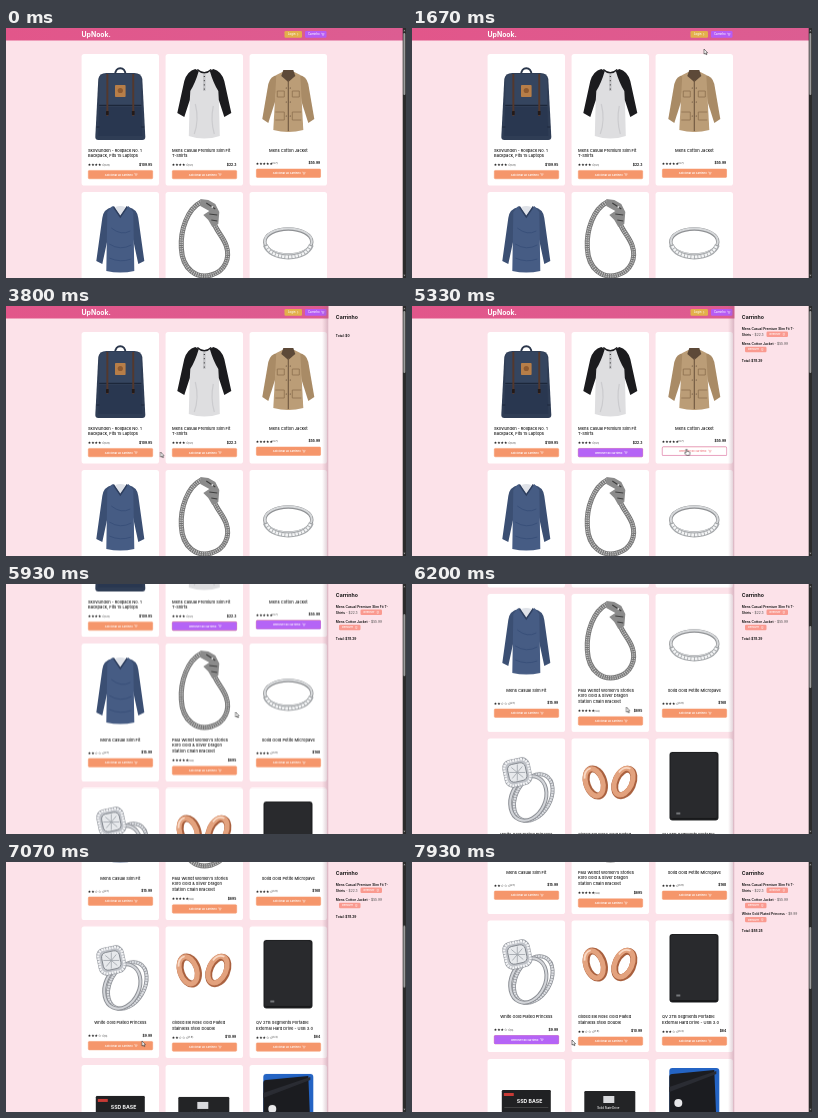
An HTML page for the animation above (8000 ms loop, 400 by 250 pixels).

```html
<!DOCTYPE html>
<html lang="pt">
<head>
<meta charset="utf-8">
<title>Loja</title>
<style>
html, body { margin: 0; width: 100%; height: 100%; overflow: hidden; background: #fce2e9; }
svg { display: block; width: 400px; height: 250px; }
text { font-family: Inter, "Open Sans", sans-serif; fill: #141414; font-weight: 500; }
.b { font-weight: 700; }
.w { fill: #fff; }
.star { font-family: "DejaVu Sans", sans-serif; }
</style>
</head>
<body>
<svg id="stage" viewBox="0 0 400 250" xmlns="http://www.w3.org/2000/svg"></svg>
<script>
const LOOP = 8000;
const css = [];

// Registers a looping keyframe track on an id; keys are [ms, declarations].
function track(id, keys, easing = 'linear') {
  const frames = keys.map(([ms, style]) => `${(ms / LOOP * 100).toFixed(3)}% { ${style} }`);
  css.push(`@keyframes ${id} { ${frames.join(' ')} }
    #${id} { animation: ${id} ${LOOP}ms ${easing} infinite; }`);
}
const at = (x, y) => `transform: translate(${x}px, ${y}px)`;

// Shows an element only inside the given [from, to] spans.
function show(id, ...spans) {
  const keys = [[0, 'opacity: 0']];
  for (const [from, to] of spans) {
    keys.push([from, 'opacity: 1']);
    if (to < LOOP) keys.push([to, 'opacity: 0']);
  }
  keys.push([LOOP, `opacity: ${spans[spans.length - 1][1] < LOOP ? 0 : 1}`]);
  track(id, keys, 'step-end');
}

const text = (x, y, size, s, cls = '', extra = '') =>
  `<text x="${x}" y="${y}" font-size="${size}" class="${cls}" ${extra}>${s}</text>`;
const rect = (x, y, w, h, r, fill, extra = '') =>
  `<rect x="${x}" y="${y}" width="${w}" height="${h}" rx="${r}" fill="${fill}" ${extra}/>`;
const path = (d, fill, extra = '') => `<path d="${d}" fill="${fill}" ${extra}/>`;
const line = (d, color, w, extra = '') =>
  `<path d="${d}" fill="none" stroke="${color}" stroke-width="${w}" ${extra}/>`;
const oval = (x, y, rx, ry, color, w, extra = '') =>
  `<ellipse cx="${x}" cy="${y}" rx="${rx}" ry="${ry}" fill="none" stroke="${color}" stroke-width="${w}" ${extra}/>`;
const dot = (x, y, r, fill) => `<circle cx="${x}" cy="${y}" r="${r}" fill="${fill}"/>`;
const group = (x, y, s, id = '') =>
  `<g ${id && `id="${id}"`} transform="translate(${x} ${y})">${s}</g>`;
const pair = s => s + `<g transform="scale(-1 1)">${s}</g>`;

// Product pictures: x from the card's centre, y from its top.
const art = {
  backpack: line('M-5 21C-6 12 6 12 5 21', '#2a364b', 1.8) +
    path('M-22 25Q-21 19 -14 19H14Q21 19 22 25L25 83Q25 86 22 86H-22Q-25 86 -25 83Z', '#2f3d55') +
    path('M-21 25Q-20 20 -14 20H14Q20 20 21 25L21 50H-21Z', '#35455f') +
    path('M-21 53H21L22 82H-22Z', '#293750') +
    line('M-21 51.5H21M-24 73H-21M21 73H24', '#1c273a', 1) +
    pair(rect(12, 20, 1.9, 42, .4, '#54382c') + rect(11.6, 57, 2.7, 4, .4, '#241a18')) +
    rect(-5.3, 31, 10.6, 12, .8, '#b77e48') + dot(0, 36.5, 2.6, '#8e5a30'),
  tshirt: path('M-9 16Q0 21 9 16L14 23L15.5 82Q0 87 -15.5 82L-14 23Z', '#dedee0') +
    line('M-9 50Q-5 66 -10 80M9 52Q6 66 10 80', '#cbcbce', 1.2) +
    pair(path('M-9 15Q-17 17 -20 27L-27 59L-20 63L-14.5 46L-14 37Q-9 29 -5.5 17Z', '#1b1b1e')) +
    line('M-7 15.5Q0 22 7 15.5', '#1b1b1e', 1.6) +
    line('M0 20V37', '#c5c5c8', 2.6) + line('M0 22V37', '#222', 1, 'stroke-dasharray="1 3.2"'),
  jacket: pair(path('M-11 21Q-18 22 -20 30L-26 65L-20 69L-13 47Z', '#a98b66')) +
    path('M-12 21L-6 18H6L12 21L15 76Q0 80 -15 76Z', '#bb9d77') +
    path('M-7 22L-5 16H5L7 22L0 28Z', '#5d4938') +
    line('M0 26V77', '#6d563f', 1.1) +
    pair(line('M-13 58H-4V66H-13M-11 37H-4V43H-11Z', '#8d7050', .8) + dot(-2, 34, .6, '#5d4938') +
      dot(-2, 48, .6, '#5d4938') + dot(-2, 62, .6, '#5d4938')),
  sweater: pair(path('M-8 15Q-17 17 -18 26L-24 69L-18 72L-12 44Z', '#3b4f73')) +
    path('M-8 14L0 24L8 14L13 20L14 79Q0 82 -14 79L-13 20Z', '#465c84') +
    path('M-5 15L0 24L5 15Q0 13 -5 15Z', '#dfe2e8') +
    line('M-7 14.5L0 25L7 14.5', '#2d3e5e', 1.5) +
    line('M-9 36Q1 44 10 39M-11 52Q0 59 11 53M-11 66Q0 71 11 67', '#39507a', 1),
  bracelet: (() => {
    const d = 'M-3 10C-17 17 -24 38 -23 56C-22 78 -7 87 7 83C21 79 26 66 22 54C19 45 13 40 10 32';
    return line(d, '#737373', 5) + line(d, '#c3c3c3', 3.4, 'stroke-dasharray="1.2 1"') +
      line(d, '#555', .6, 'stroke-dasharray="1 1.2"') +
      path('M-4 7L4 8L11 12L15 20L14 32L8 35L4 28L-1 23L5 19L-4 14Z', '#8b8b8b') +
      line('M2 11L11 17M5 22L13 23M7 28L13 29', '#3f3f3f', 1.1) + dot(8, 15, 1, '#ddd');
  })(),
  band: oval(0, 50, 23.5, 13, '#8f9194', 3.4) + oval(0, 49.4, 23.5, 13, '#d6d8da', 2) +
    line('M-23 53Q-19 64 0 65Q19 64 23 53', '#a5a8ab', 5) +
    line('M-22 54Q-18 64 0 65Q18 64 22 54', '#f3f4f5', 2.8, 'stroke-dasharray="2.5 .8"'),
  halo: oval(7, 59, 17, 25, '#8d9096', 4, 'transform="rotate(30 7 59)"') +
    oval(7, 59, 17, 25, '#dfe1e5', 2.4, 'transform="rotate(30 7 59)" stroke-dasharray="2 .6"') +
    oval(2, 60, 17, 23, '#8d9096', 4, 'transform="rotate(24 2 60)"') +
    oval(2, 60, 17, 23, '#d4d6da', 2, 'transform="rotate(24 2 60)"') +
    `<g transform="rotate(-12 -9 34)">${rect(-23, 20, 28, 28, 8, '#92969d') +
      rect(-21.3, 21.7, 24.6, 24.6, 7, '#bfc2c8', 'stroke="#f2f3f5" stroke-width="2.5" stroke-dasharray="2 .7"') +
      rect(-18, 25, 18, 18, 5, '#e7e9ec', 'stroke="#777b82" stroke-width=".8"')}</g>` +
    line('M-15 29L-3 39M-4 28L-14 40M-9 26V42M-17 34H-1', '#9ea2a9', .8),
  hoops: [-15, 14].map((x, i) => `<g transform="rotate(${i ? 24 : -18} ${x} 44)">` +
    oval(x, 44, 8.5, 14, '#a9603e', 7) + oval(x - 1, 43.5, 8.5, 14, '#e3a27e', 5) +
    line(`M${x - 9} 37Q${x - 7} 29 ${x} 29`, '#f9d9c5', 1.8) + '</g>').join(''),
  drive: rect(-24.8, 13.5, 49, 68.5, 3, '#1f2022') + rect(-23.5, 14.5, 46, 65.5, 2.5, '#292a2d') +
    line('M-22 80.5H22', '#101012', 1.2) + rect(-18, 74, 4, 2, 0, '#77797c'),
  ssd: rect(-24.5, 31, 49, 36, 1.2, '#202123') + rect(-22.5, 34, 10, 3, .5, '#c83a35') +
    text(-9.5, 43.5, 5.2, 'SSD BASE', 'b w') + rect(-22, 48, 44, .6, 0, '#555'),
  flash: rect(-26, 32, 51, 36, 1.2, '#232426') + rect(-7, 37, 11, 7, 0, '#d9dadd') +
    text(-13, 49.5, 2.8, 'Solid State Drive', 'w'),
  game: rect(-25, 9, 50, 80, 3, '#2464c4') + path('M-25 18Q-25 15 -22 15L20 11L23 86H-25Z', '#1b1c20') +
    path('M-25 28L22 12V15L-25 33Z', '#2a2c33') + dot(-16, 44, 4, '#e8e8ea')
};

// Rows of [picture, title lines, stars, rating, price, added at, hover spans].
const rows = [
  [26, 131.5, [
    ['backpack', ['Skovlunden - Rollpack No. 1', 'Backpack, Fits 15 Laptops'], 4, 3.9, '$109.95'],
    ['tshirt', ['Mens Casual Premium Slim Fit', 'T-Shirts'], 4, 4.1, '$22.3', 4270, [4050, 4560]],
    ['jacket', ['Mens Cotton Jacket'], 5, 4.7, '$55.99', 4930, [4680, 5400]]]],
  [164, 138, [
    ['sweater', ['Mens Casual Slim Fit'], 2, 2.1, '$15.99'],
    ['bracelet', ["Paul Wendt Women's Stories", 'Koro Gold &amp; Silver Dragon', 'Station Chain Bracelet'], 5, 4.6, '$695'],
    ['band', ['Solid Gold Petite Micropave'], 4, 3.9, '$168']]],
  [308.5, 131.5, [
    ['halo', ['White Gold Plated Princess'], 3, 3, '$9.99', 7730, [7130, 7860]],
    ['hoops', ['Gilded Elk Rose Gold Plated', 'Stainless Steel Double'], 2, 1.9, '$10.99'],
    ['drive', ['QV 2TB Segments Portable', 'External Hard Drive - USB 3.0'], 3, 3.3, '$64']]],
  [447, 138, [['ssd'], ['flash'], ['game']]]
];

const cartIcon = (x, y, color) =>
  line(`M${x} ${y}h.6l.5 1.5h1.5l.4-1.1h-2.1`, color, .35) +
  dot(x + 1.2, y + 2.1, .3, color) + dot(x + 2.3, y + 2.1, .3, color);

function button(y, fill, color, label, edge = fill) {
  return rect(-32, y, 64.4, 8.4, 1, fill, `stroke="${edge}" stroke-width=".5"`) +
    text(-1.5, y + 5.2, 2.7, label, '', `text-anchor="middle" style="fill:${color};font-weight:600"`) +
    cartIcon(14, y + 3, color);
}

function card([pic, title, stars, rate, price, added, hover], col, top, height) {
  let s = rect(-38.7, 0, 77.4, height, 2.6, '#fff') + art[pic];
  if (title) {
    const n = title.length;
    title.forEach((t, i) => {
      s += n > 1 ? text(-32.3, 97.5 + i * 5.9, 4.05, t)
        : text(0, 97.5, 4.05, t, '', 'text-anchor="middle"');
    });
    const y = [0, 115, 116.4, 122.8][n];
    s += text(-32.5, y - 4.4, 3.8, '★'.repeat(stars) + '☆'.repeat(5 - stars), 'star') +
      text(-16.2, y - 4.8, 2.5, `(${rate})`, '', 'style="fill:#555"') +
      text(32, y - 4.6, 3.35, price, 'b', 'text-anchor="end"') +
      button(y, '#f5966b', '#fff', 'Adicionar ao carrinho');
    if (added) {
      s += `<g id="${pic}-in">${button(y, '#b564f6', '#fff', 'Remover do carrinho')}</g>` +
        `<g id="${pic}-over">${button(y, '#fff', '#ef7f86', 'Remover do carrinho')
          .replace('stroke="#fff"', 'stroke="#ef8d90"')}</g>`;
      show(pic + '-in', [added, LOOP]);
      show(pic + '-over', hover);
    }
  }
  return group(114.3 + col * 84, top, s);
}

const header = rect(0, 0, 397, 12.5, 0, 'url(#bar)') +
  text(75.5, 8.8, 6.9, 'UpNook.', 'b w') +
  rect(278.5, 3, 17.5, 6.7, 1.2, '#e3b04b') + text(282, 7.3, 2.8, 'Login', 'w') +
  line('M291 5.2l1.2 1.1l-1.2 1.1', '#fff', .4) +
  rect(299, 3, 21.5, 6.7, 1.2, '#b65cf5') + text(302, 7.3, 2.8, 'Carrinho', 'w') +
  cartIcon(315.2, 5.2, '#fff');

const page = header + rows.map(([top, height, items]) =>
  items.map((item, col) => card(item, col, top, height)).join('')).join('');

const pill = (x, y) => rect(x, y, 21.5, 5.4, 1.2, '#fa9a90') +
  text(x + 3, y + 3.6, 2.6, 'Remover', 'w') +
  line(`M${x + 16.3} ${y + 1.8}h2m-1.7 .2l.2 1.8h1l.2-1.8`, '#fff', .35);
const entry = (id, y, name, price) => `<g id="${id}">` +
  text(329.8, y, 3.3, `${name}<tspan style="font-weight:400;fill:#555"> - ${price}</tspan>`, '', 'style="font-weight:600"') +
  pill(333, y + 2.3) + '</g>';

const totals = [[30, '$0', 0, 4270], [41.5, '$22.3', 4270, 4930],
  [55, '$78.29', 4930, 7730], [69, '$88.28', 7730, LOOP]];

const drawer = rect(316, 0, 6.5, 250, 0, 'url(#shade)') + rect(322.5, 0, 78, 250, 0, '#fce2e9') +
  text(329.8, 12.6, 5.2, 'Carrinho', 'b') +
  `<g id="item1">${text(329.8, 24.2, 3.3, 'Mens Casual Premium Slim Fit T-', '', 'style="font-weight:600"') +
    text(329.8, 29.6, 3.3, 'Shirts<tspan style="font-weight:400;fill:#555"> - $22.3</tspan>', '', 'style="font-weight:600"') +
    pill(354.5, 25.6)}</g>` +
  entry('item2', 38.5, 'Mens Cotton Jacket', '$55.99') +
  entry('item3', 52.6, 'White Gold Plated Princess', '$9.99') +
  totals.map(([y, sum], i) => `<g id="total${i}">${text(329.8, y + 1.2, 3.2, 'Total: ' + sum, 'b')}</g>`).join('');

show('item1', [4270, LOOP]);
show('item2', [4930, LOOP]);
show('item3', [7730, LOOP]);
totals.forEach(([, , from, to], i) => show('total' + i, [from, to]));

const scrollbar = rect(396.7, 0, 3.3, 250, 0, '#2b2b2b') +
  path('M397.4 3.2l1-1.5l1 1.5z', '#a0a0a0') + path('M397.4 246.8l1 1.5l1-1.5z', '#a0a0a0') +
  `<g id="thumb">${rect(397.4, 5, 1.9, 62, .9, '#9c9c9c')}</g>`;

const edge = 'stroke="#222" stroke-width=".55" stroke-linejoin="round"';
const cursor = `<g id="cursor"><g id="pointer">
  <g id="arrow">${path('M0 0V5.1L1.2 4.1L2 5.8L2.9 5.4L2.1 3.8H3.6Z', '#fff', edge)}</g>
  <g id="hand">${path('M-.6 .4Q0 -.4 .6 .4V2.4L3 2.9Q3.6 3.1 3.5 4L3 6.3H-.2L-2 3.9Q-1.6 3.1 -.6 3.9Z', '#fff', edge)}</g>
</g></g>`;

const hold = 'animation-timing-function: ease-in-out; ';
track('page', [[0, at(0, 0)], [5340, at(0, 0)], [5700, at(0, -62)], [6200, at(0, -154)],
  [6800, at(0, -217)], [7130, at(0, -250)], [LOOP, at(0, -250)]]);
track('thumb', [[0, at(0, 0)], [5340, at(0, 0)], [5700, at(0, 15)], [6200, at(0, 37)],
  [6800, at(0, 52)], [7130, at(0, 60)], [LOOP, at(0, 60)]]);
track('drawer', [[0, at(86, 0)], [2400, at(86, 0) + '; animation-timing-function: ease'],
  [2900, at(0, 0)], [LOOP, at(0, 0)]]);
track('cursor', [[0, at(262, 226)], [800, hold + at(262, 226)], [1600, at(292, 21)], [1670, hold + at(292, 21)],
  [2070, at(311, 6)], [3240, hold + at(311, 6)], [3740, at(154.5, 146)], [3800, hold + at(154.5, 146)],
  [4070, at(199, 146)], [4400, hold + at(199, 146)], [4850, at(274.5, 143)], [5340, at(274.5, 143)],
  [6130, at(214.5, 123)], [6200, at(214.5, 123)], [6800, at(144.5, 183)], [7130, at(134, 178)],
  [7740, hold + at(134, 178)], [7930, at(160, 178)], [LOOP, at(160, 178)]]);
show('pointer', [800, LOOP]);
const onLink = [[2000, 3300], [4000, 4560], [4680, 5400], [7130, 7850]];
show('hand', ...onLink);
show('arrow', [800, 2000], [3300, 4000], [4560, 4680], [5400, 7130], [7850, LOOP]);

document.getElementById('stage').innerHTML = `<defs>
  <linearGradient id="bar"><stop stop-color="#e2568a"/><stop offset="1" stop-color="#dc5d92"/></linearGradient>
  <linearGradient id="shade"><stop stop-color="#a06a80" stop-opacity="0"/><stop offset="1" stop-color="#a06a80" stop-opacity=".38"/></linearGradient>
</defs>` + rect(0, 0, 400, 250, 0, '#fce2e9') +
  `<g id="page">${page}</g><g id="drawer">${drawer}</g>` + scrollbar + cursor;

const sheet = document.createElement('style');
sheet.textContent = css.join('\n');
document.head.append(sheet);
</script>
</body>
</html>
```
